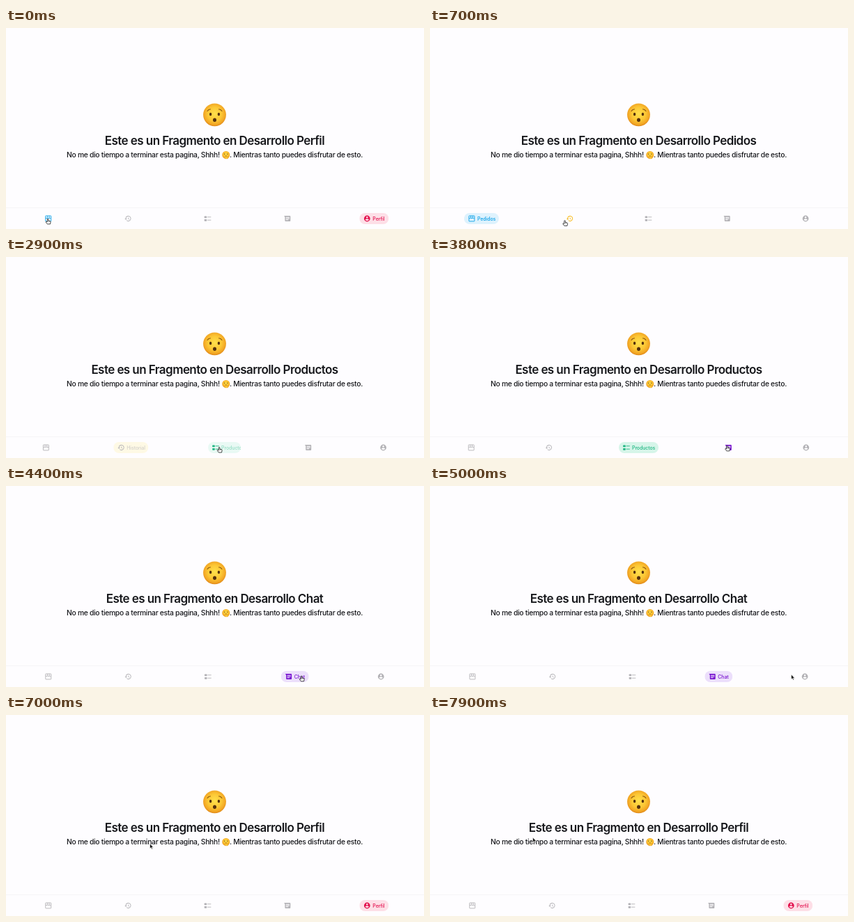
These frames come from a looping animation (600 by 289 pixels, 8 s). An HTML page:

```html
<!DOCTYPE html>
<html lang="es">
<head>
<meta charset="utf-8">
<style>
  html, body { margin: 0; width: 100%; height: 100%; overflow: hidden; background: #fefdff; }
  #stage { display: block; width: 100%; height: 100%; }
  text { font-family: Inter, "Open Sans", sans-serif; font-weight: 500; font-optical-sizing: none; fill: #17181c; }
  #title { font-size: 17px; font-weight: 600; letter-spacing: -.56px; text-anchor: middle; }
  .sub { font-size: 10.3px; letter-spacing: -.29px; }
  .label { font-size: 7px; letter-spacing: -.1px; }
  .line { fill: none; stroke: currentColor; stroke-width: 2; }
</style>
</head>
<body>
<svg id="stage" viewBox="0 0 600 289">
  <defs>
    <radialGradient id="skin" cx=".5" cy=".46" r=".55">
      <stop offset="0" stop-color="#ffe04c"/>
      <stop offset=".55" stop-color="#fcc735"/>
      <stop offset=".85" stop-color="#f2a624"/>
      <stop offset="1" stop-color="#dd8417"/>
    </radialGradient>
  </defs>
  <rect width="600" height="289" fill="#fefdff"/>

  <g transform="translate(299.5 124.8)">
    <circle r="16.4" fill="url(#skin)"/>
    <path d="M-10.4-5.4Q-9-8-6-8.1M10.4-5.4Q9-8 6-8.1" fill="none" stroke="#8a5512" stroke-width="1.1" stroke-linecap="round"/>
    <g fill="#54300d">
      <ellipse cx="-5.9" cy="-.8" rx="1.7" ry="2.3"/>
      <ellipse cx="5.9" cy="-.8" rx="1.7" ry="2.3"/>
      <ellipse cy="7.4" rx="2.5" ry="2.7"/>
    </g>
  </g>

  <text id="title" x="299.5" y="168.3"></text>
  <text class="sub" x="87" y="186.2">No me dio tiempo a terminar esta pagina, Shhh!</text>
  <text class="sub" x="512" y="186.2" text-anchor="end">. Mientras tanto puedes disfrutar de esto.</text>

  <g transform="translate(315.8 182.4)">
    <circle r="5.5" fill="url(#skin)"/>
    <g fill="#54300d"><ellipse cx="-2" cy="-1.2" rx=".6" ry=".8"/><ellipse cx="2" cy="-1.2" rx=".6" ry=".8"/></g>
    <path d="M-1.6 1.6Q0 1 1.6 1.6" fill="none" stroke="#54300d" stroke-width=".6"/>
    <path d="M-.5.8Q0 .2.5.8V3H2.6Q3.4 4 2.6 5.5H-1.5Q-2.6 4-.5 3Z" fill="#ffcb3c" stroke="#d98c1c" stroke-width=".4"/>
  </g>

  <rect y="258" width="600" height="1" fill="#f5f4f7"/>
  <g id="tabs"></g>

  <g id="hand">
    <g transform="scale(.88)">
      <path d="M-.9.8Q0-.5.9.8V3.4L3.6 4Q4.8 4.4 4.6 5.6L3.9 9H-.8L-3.2 5.8Q-3.1 4.6-1.9 5L-.9 5.7Z"
        fill="#fff" stroke="#1a1a1a" stroke-width=".9" stroke-linejoin="round"/>
      <path d="M1 3.4V5.4M2.5 3.9V5.5" stroke="#1a1a1a" stroke-width=".5"/>
    </g>
  </g>
  <path id="arrow" d="M0 0V7L1.6 5.6L2.7 8L3.9 7.4L2.8 5.2H5Z" fill="#111" stroke="#fff" stroke-width=".6"/>
</svg>
<script>
const LOOP = 8000, STEP = 100, FADE = 500, IDLE = 22, GREY = '#b3b2b6';

const tabs = [
  { name: 'Pedidos', full: 50, fg: '#079fe8', bg: '#def2fd',
    icon: '<path class="line" d="M3 10V4Q3 3 4 3H20Q21 3 21 4V10V20Q21 21 20 21H4Q3 21 3 20ZM3 10Q6 13 9 10Q12 13 15 10Q18 13 21 10M9 3V10M15 3V10"/>' },
  { name: 'Historial', full: 50, fg: '#f8b712', bg: '#fff6cc',
    icon: '<path d="M13 3a9 9 0 0 0-9 9H1l3.9 3.9L9 12H6a7 7 0 1 1 2.06 4.94l-1.42 1.42A9 9 0 1 0 13 3zm-1 5v5l4.3 2.5.7-1.2-3.5-2.1V8z"/>' },
  { name: 'Productos', full: 57, fg: '#1fb682', bg: '#d6f5e9',
    icon: '<path class="line" d="M11 7H23M11 17H23"/><rect x="1" y="4" width="8" height="6.5" rx="1.5"/><rect x="1" y="14" width="8" height="6.5" rx="1.5"/>' },
  { name: 'Chat', full: 40, fg: '#7710cf', bg: '#ecdffb',
    icon: '<path fill-rule="evenodd" d="M1 3H20Q22 3 22 5V19Q22 21 20 21H6Q4 21 4 19V7ZM7 7V9H19V7ZM7 11V13H19V11ZM7 15V17H15V15Z"/>' },
  { name: 'Perfil', full: 42, fg: '#e3124f', bg: '#fddfe7',
    icon: '<path fill-rule="evenodd" d="M12 2a10 10 0 1 0 0 20 10 10 0 0 0 0-20zm0 3a3 3 0 1 1 0 6 3 3 0 0 1 0-6zm0 14.2a7.2 7.2 0 0 1-6-3.2c0-2 4-3.1 6-3.1s6 1.1 6 3.1a7.2 7.2 0 0 1-6 3.2z"/>' }
];

// Click times, one per tab in order
const clicks = [50, 1650, 2800, 4000, 5500];

// Pointer tip: time, x, y
const path = [
  [0, 60, 274], [200, 61, 274], [700, 193.5, 276.5], [1100, 203, 275.5], [1900, 205.5, 274.8],
  [2100, 208, 275], [2600, 312, 274], [3000, 305, 273], [3300, 310, 273], [3800, 426.5, 271],
  [4500, 424, 273], [5000, 518.5, 271], [5300, 537, 274], [6100, 537, 276], [6300, 524, 268],
  [6500, 305, 190], [6700, 305, 190], [7300, 108, 180], [7700, 142, 178], [7900, 147.5, 176]
];

const $ = id => document.getElementById(id);
const clamp = v => Math.max(0, Math.min(1, v));
const ease = v => 1 - Math.pow(1 - clamp(v), 2.4);
const smooth = v => v * v * (3 - 2 * v);
const set = (el, attrs) => { for (const k in attrs) el.setAttribute(k, attrs[k]); };

$('tabs').innerHTML = tabs.map(tab => `
  <svg y="266" height="16">
    <rect height="16" rx="8" fill="${tab.bg}"/>
    <g transform="translate(11 8) scale(.44) translate(-12 -12)" fill="currentColor">${tab.icon}</g>
    <text class="label" x="19" y="10.6">${tab.name}</text>
  </svg>`).join('');
[...$('tabs').children].forEach((el, i) => {
  const [pill, icon, label] = el.children;
  Object.assign(tabs[i], { el, pill, icon, label });
});

function pointer(t) {
  let i = path.length - 1;
  while (path[i][0] > t) i--;
  const a = path[i], b = path[i + 1] || a;
  const k = b === a ? 0 : smooth((t - a[0]) / (b[0] - a[0]));
  return [a[1] + (b[1] - a[1]) * k, a[2] + (b[2] - a[2]) * k];
}

function draw(t) {
  const last = tabs.length - 1;
  let active = last;
  clicks.forEach((c, i) => { if (t >= c) active = i; });
  const before = active ? active - 1 : last;
  const since = (t - clicks[active] + LOOP) % LOOP;
  const grown = ease(since / FADE);
  const tint = clamp(since / 200);

  // The label limit runs past its own width, so closing starts late
  const widths = tabs.map((tab, i) => {
    const open = i === active ? grown : i === before ? 1 - grown : 0;
    return IDLE + Math.min(tab.full - IDLE, 60 * open);
  });
  const gap = (592 - widths.reduce((a, b) => a + b)) / 10;
  const [px, py] = pointer(t);
  let x = 3.5, over = false;

  tabs.forEach((tab, i) => {
    const w = widths[i], on = i === active;
    x += gap;
    const hover = px >= x && px <= x + w && py >= 266 && py <= 282;
    over = over || hover;
    set(tab.el, { x, width: w });
    set(tab.pill, { width: w, opacity: on ? tint : i === before ? 1 - tint : 0 });
    tab.icon.style.color = on || hover ? tab.fg : GREY;
    tab.label.style.fill = on ? tab.fg : GREY;
    set(tab.label, { opacity: on ? grown : i === before ? 1 - grown : 0 });
    x += w + gap;
  });

  $('title').textContent = 'Este es un Fragmento en Desarrollo ' + tabs[active].name;
  const at = `translate(${px} ${py})`;
  set($('hand'), { transform: at, visibility: over ? 'visible' : 'hidden' });
  set($('arrow'), { transform: at, visibility: over ? 'hidden' : 'visible' });
}

const start = performance.now();
function tick() {
  const t = (performance.now() - start) % LOOP;
  draw(Math.floor(t / STEP) * STEP);
  requestAnimationFrame(tick);
}
tick();
</script>
</body>
</html>
```
